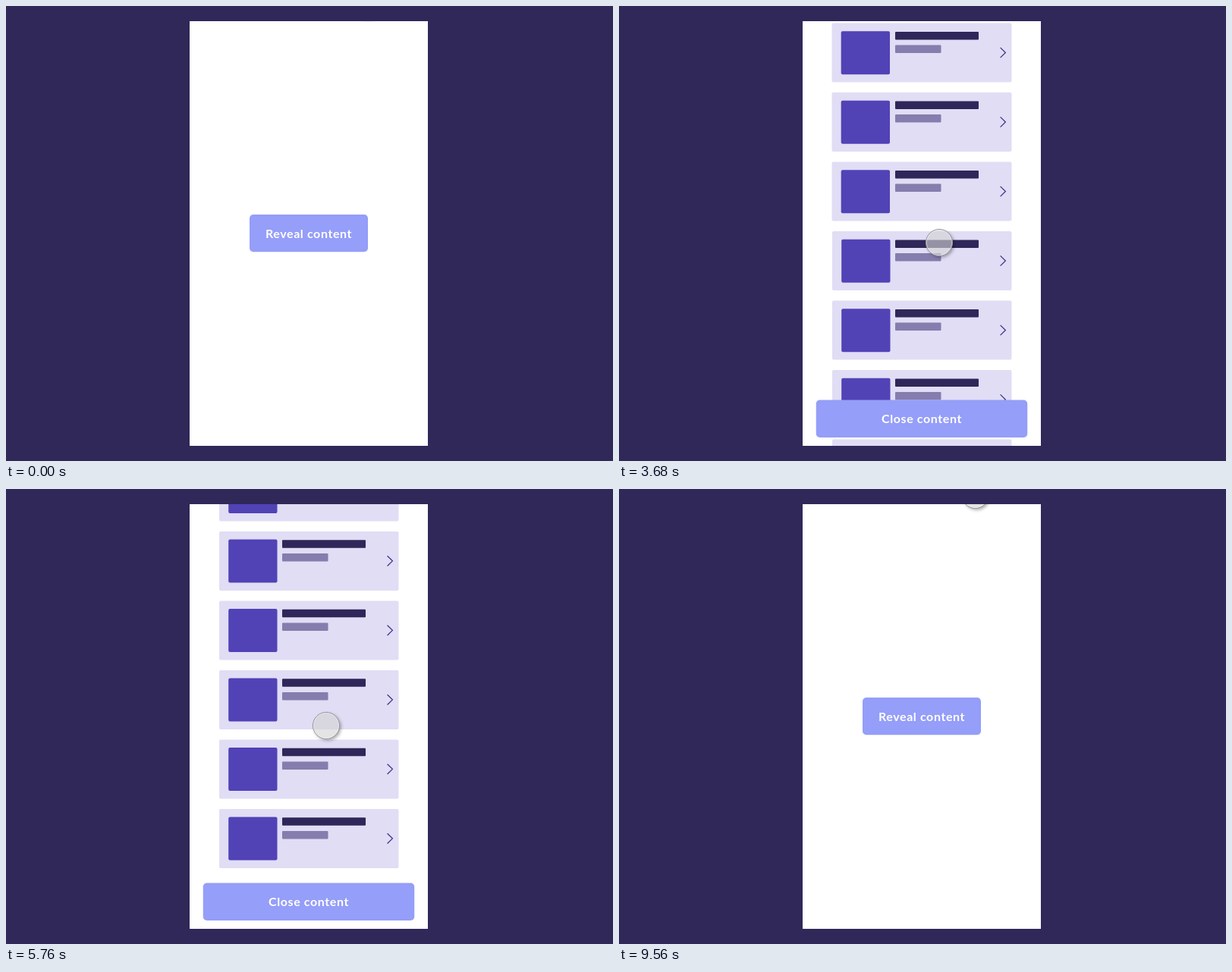
An HTML page with a canvas that plays this animation: 800 by 600 pixels, repeating every 9900 ms.

```html
<!DOCTYPE html>
<html lang="en">
<head>
<meta charset="utf-8">
<title>Reveal content</title>
<style>
  html, body { margin: 0; width: 100%; height: 100%; overflow: hidden; background: #2f2858; }
  canvas { display: block; width: 800px; height: 600px; }
</style>
</head>
<body>
<canvas id="stage" width="800" height="600"></canvas>
<script>
const ctx = document.getElementById('stage').getContext('2d');
const LOOP = 9900;
const PANEL = { x: 242, y: 20, w: 314, h: 560 };
const CENTER = 399;
const LIST = { top: 66.2, pitch: 91.5, count: 9 };
const OPEN_AT = [1640, 1740, 1861, 1915, 2010, 2105];
const FADE = 300;

// [time, offset] and [time, x, y] keys
const SCROLL = [[2900, 0], [3680, 43.5], [4600, 165.2], [5760, 376.2], [6250, 392]];
const POINTER = [
  [60, 475, -1], [460, 460, 155], [620, 460, 155], [780, 450, 256],
  [940, 450, 256], [1140, 422, 312], [6350, 422, 312], [6860, 412, 540],
  [8860, 412, 540], [9560, 469.5, 8]
];

const clamp = v => Math.max(0, Math.min(1, v));
const phase = (t, start, span) => clamp((t - start) / span);
const sine = u => (1 - Math.cos(Math.PI * u)) / 2;
const cubic = u => u < 0.5 ? 4 * u ** 3 : 1 - 4 * (1 - u) ** 3;
const mix = (a, b, u) => a + (b - a) * u;

function scrollAt(t) {
  const k = SCROLL, last = k.length - 1;
  if (t <= k[0][0]) return k[0][1];
  if (t >= k[last][0]) return k[last][1];
  const slope = i => (k[i + 1][1] - k[i][1]) / (k[i + 1][0] - k[i][0]);
  const tangent = i => {
    if (i === 0 || i === last) return 0;
    const a = slope(i - 1), b = slope(i);
    return 2 * a * b / (a + b);
  };
  let i = 0;
  while (t > k[i + 1][0]) i++;
  const h = k[i + 1][0] - k[i][0], u = (t - k[i][0]) / h, v = 1 - u;
  return k[i][1] * (1 + 2 * u) * v * v + tangent(i) * h * u * v * v
    + k[i + 1][1] * u * u * (3 - 2 * u) - tangent(i + 1) * h * u * u * v;
}

function pointerAt(t) {
  const k = POINTER;
  if (t <= k[0][0]) return k[0].slice(1);
  for (let i = 1; i < k.length; i++) {
    if (t > k[i][0]) continue;
    const a = k[i - 1], b = k[i];
    const u = (t - a[0]) / (b[0] - a[0]);
    const e = b[0] - a[0] > 450 ? sine(u) : u;
    return [mix(a[1], b[1], e), mix(a[2], b[2], e)];
  }
  return k[k.length - 1].slice(1);
}

function openness(t) {
  return t < 5000 ? sine(phase(t, 1644, 510)) : 1 - sine(phase(t, 7675, 640));
}

function itemAlpha(i, t) {
  if (t < 5000) return cubic(phase(t, OPEN_AT[Math.min(i, OPEN_AT.length - 1)], FADE));
  return 1 - cubic(phase(t, 7620 - 120 * (i - 3), FADE));
}

function box(x, y, w, h, r, color) {
  ctx.fillStyle = color;
  ctx.beginPath();
  ctx.roundRect(x, y, w, h, r);
  ctx.fill();
}

function drawItem(y, i, alpha) {
  const left = i < 3 ? 280.5 : 281;
  box(left, y, 517.5 - left, 78, 2, '#e0ddf5');
  box(left + 12.2, y + 10.6, 64.3, 57, 2, '#5142b6');
  box(364, y + 11.4, 110, 10.5, 1, '#2f2759');
  box(364, y + 29, 60.5, 10.5, 1, '#857dad');
  ctx.strokeStyle = '#3a2e86';
  ctx.lineWidth = 1.2;
  ctx.beginPath();
  ctx.moveTo(502.6, y + 32.3);
  ctx.lineTo(509.4, y + 38.9);
  ctx.lineTo(502.6, y + 45.5);
  ctx.stroke();
  // a white veil fades the whole item as one group
  if (alpha < 1) {
    ctx.fillStyle = `rgba(255,255,255,${1 - alpha})`;
    ctx.fillRect(left - 1, y - 1, 520 - left, 80);
  }
}

function drawLabel(text, y, stretch, alpha) {
  if (alpha <= 0) return;
  ctx.save();
  ctx.translate(CENTER - 0.3, y);
  ctx.scale(stretch, 1);
  ctx.globalAlpha = alpha;
  ctx.fillStyle = '#fff';
  ctx.font = '700 16px Lato, "Open Sans", sans-serif';
  ctx.letterSpacing = '0.6px';
  ctx.textAlign = 'center';
  ctx.textBaseline = 'alphabetic';
  ctx.fillText(text, 0.3, 0);
  ctx.restore();
}

function drawButton(p) {
  const w = mix(156, 278.5, p), y = mix(275, 519.6, p);
  box(CENTER - w / 2, y, w, 49.3, 5, '#959ef8');
  drawLabel('Reveal content', y + 30.6, w / 156, 1 - p);
  drawLabel('Close content', y + 30.6, w / 278.5, p);
}

function drawPointer(x, y) {
  const r = 17.5;
  ctx.save();
  ctx.beginPath();
  ctx.rect(0, 0, 800, 600);
  ctx.arc(x, y, r, 0, 7);
  ctx.clip('evenodd');
  ctx.shadowColor = 'rgba(0,0,0,0.35)';
  ctx.shadowBlur = 4;
  ctx.shadowOffsetX = ctx.shadowOffsetY = 2;
  ctx.fillStyle = '#999';
  ctx.beginPath();
  ctx.arc(x, y, r, 0, 7);
  ctx.fill();
  ctx.restore();

  ctx.fillStyle = 'rgba(211,211,211,0.62)';
  ctx.beginPath();
  ctx.arc(x, y, r, 0, 7);
  ctx.fill();
  ctx.strokeStyle = '#96969c';
  ctx.lineWidth = 1;
  ctx.stroke();
  ctx.strokeStyle = 'rgba(255,255,255,0.4)';
  ctx.beginPath();
  ctx.arc(x, y, r - 1, 0, 7);
  ctx.stroke();
}

function draw(t) {
  ctx.fillStyle = '#2f2858';
  ctx.fillRect(0, 0, 800, 600);
  ctx.save();
  ctx.beginPath();
  ctx.rect(PANEL.x, PANEL.y, PANEL.w, PANEL.h);
  ctx.clip();
  ctx.fillStyle = '#fff';
  ctx.fillRect(PANEL.x, PANEL.y, PANEL.w, PANEL.h);
  const scroll = scrollAt(t);
  for (let i = 0; i < LIST.count; i++) {
    const y = LIST.top + i * LIST.pitch - scroll, alpha = itemAlpha(i, t);
    if (alpha > 0 && y > -70 && y < 590) drawItem(y, i, alpha);
  }
  drawButton(openness(t));
  drawPointer(...pointerAt(t));
  ctx.restore();
}

const begin = performance.now();
function tick() {
  draw((performance.now() - begin) % LOOP);
  requestAnimationFrame(tick);
}
tick();
</script>
</body>
</html>
```
